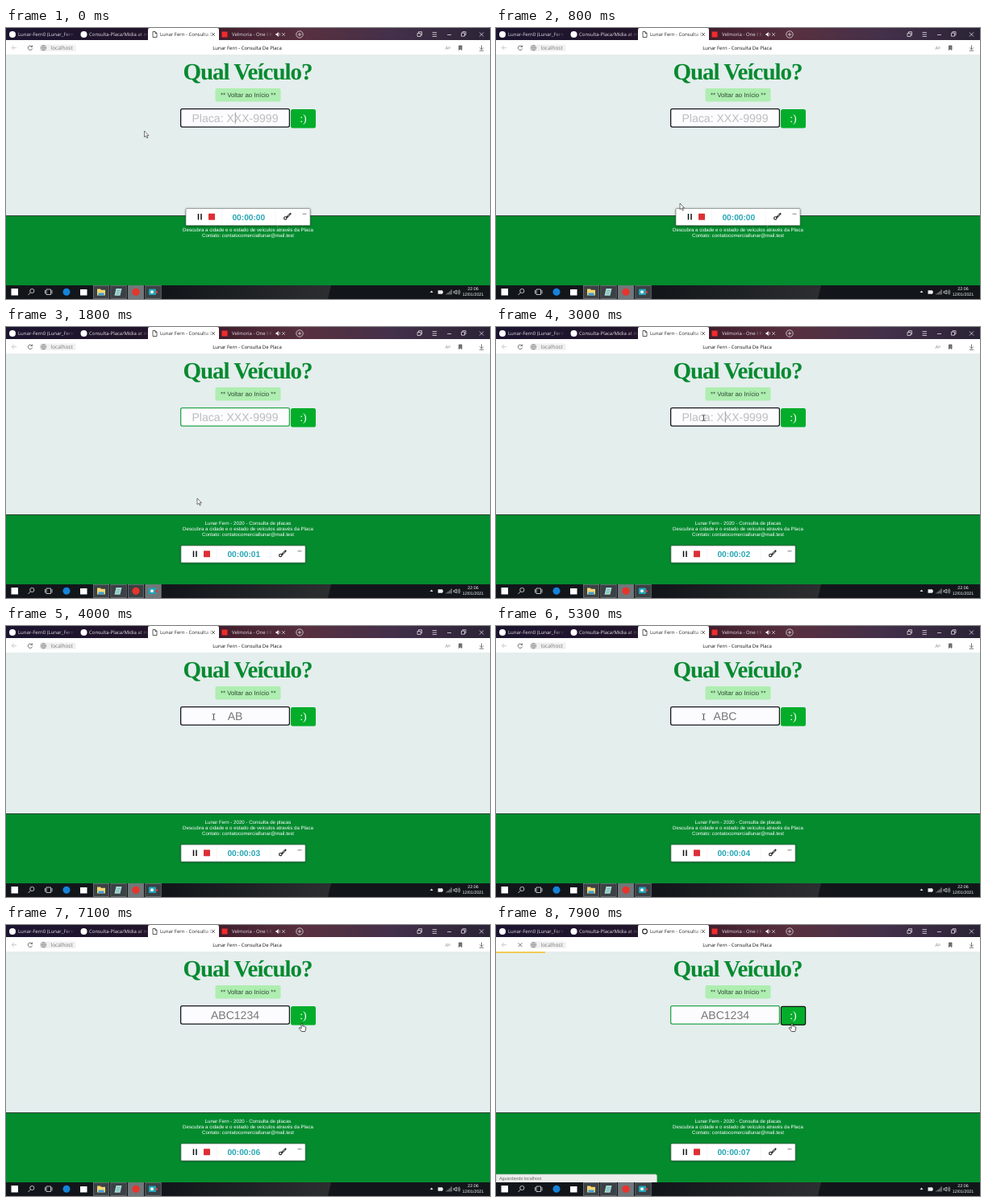
Write an HTML page that moves like this. It is 600 px wide and 337 px high and loops after 8000 ms.

```html
<!DOCTYPE html>
<html lang="pt-BR">
<head>
<meta charset="utf-8">
<title>Consulta De Placa</title>
<style>
  html, body { margin: 0; width: 100%; height: 100%; overflow: hidden; background: #e4eeed; }
  svg { display: block; width: 600px; height: 337px; }
  text { white-space: pre; text-rendering: geometricPrecision; }
  .ui { font: 6px "Open Sans", "Noto Sans", sans-serif; }
  .url { font-size: 6.5px; }
  .page { font-family: "Liberation Sans", Arial, sans-serif; }
  .serif { font-family: "Liberation Serif", "Times New Roman", serif; }
  .mid { text-anchor: middle; }
  .line { fill: none; stroke-width: .8; }
</style>
</head>
<body>
<svg viewBox="0 0 600 337" xmlns="http://www.w3.org/2000/svg">
  <defs>
    <linearGradient id="bar"><stop stop-color="#1c1530"/><stop offset=".28" stop-color="#21142a"/><stop offset=".46" stop-color="#44202f"/><stop offset=".62" stop-color="#58303f"/><stop offset=".8" stop-color="#43304a"/><stop offset="1" stop-color="#2a2336"/></linearGradient>
    <linearGradient id="glow"><stop stop-color="#12161a"/><stop offset="1" stop-color="#2c2e30"/></linearGradient>
    <linearGradient id="light"><stop offset=".8" stop-color="#e6e2e8"/><stop offset="1" stop-color="#e6e2e8" stop-opacity=".1"/></linearGradient>
    <linearGradient id="dark"><stop offset=".8" stop-color="#222"/><stop offset="1" stop-color="#222" stop-opacity=".1"/></linearGradient>
    <filter id="soft" x="-10%" y="-40%" width="120%" height="180%"><feDropShadow dx="0" dy=".5" stdDeviation="1.2" flood-opacity=".55"/></filter>
  </defs>

  <!-- page -->
  <rect width="600" height="337" fill="#e4eeed"/>
  <text class="serif mid" x="299.5" y="63.8" font-size="29" font-weight="700" letter-spacing="-1" fill="#078a30">Qual Veículo?</text>
  <rect x="259.5" y="75" width="81" height="16.5" rx="2" fill="#aeeeb0"/>
  <text class="page mid" x="300.2" y="85.6" font-size="7.86" fill="#2f4a35">** Voltar ao Início **</text>
  <rect id="field" x="216.6" y="100.7" width="134.8" height="22.4" rx="2" fill="#fcfcff" stroke-width="1.3"/>
  <text id="plate" class="page mid" x="284" y="117" font-size="14.05"></text>
  <path id="caret" d="M284.3 105v14" stroke="#777" stroke-width=".7"/>
  <rect x="353" y="101" width="31" height="23.5" rx="2.5" fill="#03ad2a"/>
  <rect id="ring" x="353.4" y="101.4" width="30.2" height="22.7" rx="2" fill="none" stroke="#111" stroke-width="1.2"/>
  <text class="serif mid" x="368.5" y="117" font-size="14" fill="#fff">:)</text>

  <!-- footer -->
  <rect y="234" width="600" height="87" fill="#048b2e"/>
  <rect y="233" width="600" height="1" fill="#26402f"/>
  <g class="page mid" font-size="6.15" fill="#fff">
    <text x="300" y="246">Lunar Fern - 2020 - Consulta de placas</text>
    <text x="300" y="253">Descubra a cidade e o estado de veículos através da Placa</text>
    <text x="300" y="260">Contato: contatocomerciallunar@mail.test</text>
  </g>

  <!-- tabs -->
  <rect width="600" height="16" fill="url(#bar)"/>
  <path d="M176 16V2q0-2 2-2h84q2 0 2 2v14z" fill="#fff"/>
  <circle cx="8" cy="8" r="4" fill="#fff"/>
  <circle cx="96.5" cy="8" r="4" fill="#fff"/>
  <rect x="267.5" y="4.5" width="7" height="7" fill="#f02b2b"/>
  <g class="ui" fill="url(#light)">
    <text x="15" y="10.2">Lunar-Fern0 (Lunar_Fern</text>
    <text x="103" y="10.2">Consulta-Placa/Midia at m</text>
    <text x="280" y="10.2">Velmoria - One I K</text>
  </g>
  <text class="ui" x="191" y="10.2" fill="url(#dark)">Lunar Fern - Consulta D</text>
  <path id="doc" class="line" d="M182 4.5h3l2 2v5h-5zM185 4.5v2h2" stroke="#333"/>
  <circle id="spin" cx="184.5" cy="8" r="2.9" fill="none" stroke="#222" stroke-width="1.1"/>
  <path class="line" d="M255 6l4 4m0-4l-4 4" stroke="#555"/>
  <path d="M334.5 7h1.2l2-2v6l-2-2h-1.2z" fill="#fff"/>
  <path class="line" d="M338.8 6.2q1.5 1.8 0 3.6M342 6l4 4m0-4l-4 4" stroke="#c8c0c8"/>
  <g class="line" stroke="#e2dce4">
    <circle cx="364" cy="8" r="4.2"/>
    <path d="M361.8 8h4.4M364 5.8v4.4"/>
    <path d="M510 6.5h4v4h-4zM511.5 6.5v-1.8h4v4.3h-1.5"/>
    <path d="M528.5 5.5h5.5M528.5 8h5.5M528.5 10.5h5.5M547 8.5h5"/>
    <path d="M564.5 6.2h4v4h-4zM566 6v-1.3h4v4h-1.3M587 5.5l5 5m0-5l-5 5"/>
  </g>

  <!-- toolbar -->
  <rect y="15" width="600" height="18" fill="#fff"/>
  <path class="line" d="M13 24.7H7.5M10 22l-2.7 2.7 2.7 2.7" stroke="#bbb"/>
  <g class="line" stroke="#555">
    <path id="reload" d="M32.2 23.2a2.7 2.7 0 1 0 .4 2.3M32.6 21.5v2h-2"/>
    <path id="stop" d="M27.6 22.3l4.8 4.8m0-4.8l-4.8 4.8"/>
    <path d="M565 22h-3.5v5.5l1.75-1.6 1.75 1.6z" fill="#777"/>
    <path d="M589.5 21.5v5M587.2 24.5l2.3 2.3 2.3-2.3M586.8 28.2h5.4"/>
  </g>
  <rect x="42" y="20.5" width="44.5" height="8.5" rx="1.5" fill="#f1f1f1"/>
  <g class="line" stroke="#888">
    <circle cx="46.5" cy="24.7" r="3.2"/>
    <path d="M43.5 24.7h6M46.5 21.5q-2.6 3.2 0 6.4q2.6-3.2 0-6.4"/>
  </g>
  <text class="ui url" x="55.5" y="27" fill="#777">localhost</text>
  <text class="ui mid" x="299" y="26.8" fill="#111">Lunar Fern - Consulta De Placa</text>
  <text class="ui" x="544.5" y="27" fill="#888">A<tspan dy="-1.5" font-size="4">B</tspan></text>
  <rect id="load" y="33.2" height="1.7" fill="#f3c63b"/>

  <!-- status -->
  <g id="status">
    <path d="M0 310h197.5q2 0 2 2v8.5H0z" fill="#eceeec" stroke="#aab5ac" stroke-width=".6"/>
    <text class="page" x="4" y="317" font-size="5.4" fill="#666">Aguardando localhost</text>
  </g>

  <!-- taskbar -->
  <rect y="320" width="600" height="17" fill="#12161a"/>
  <path d="M200 320h203l-4 17H200z" fill="url(#glow)"/>
  <g fill="#3b4145" stroke="#84898c" stroke-width=".6">
    <rect x="108.3" y="320.3" width="19.4" height="16.4"/>
    <rect x="129.8" y="320.3" width="19.4" height="16.4"/>
    <rect id="appA" x="151.3" y="320.3" width="19.4" height="16.4"/>
    <rect id="appB" x="172.8" y="320.3" width="19.4" height="16.4"/>
  </g>
  <rect x="6.5" y="324" width="8.5" height="8.5" fill="#fff"/>
  <g class="line" stroke="#e4e6e8">
    <circle cx="38" cy="327" r="2.6" transform="translate(-5.7 0)"/>
    <path d="M30.4 329l-2.9 3M50 325h5.5v6.5H50zM48.5 326v4.5M57 326v4.5"/>
  </g>
  <circle cx="75" cy="328.3" r="4.5" fill="#1683d8"/>
  <rect x="92" y="325" width="8.5" height="7.5" fill="#fff"/>
  <path d="M113 324.5h4l1 1.3h5v6.7h-10z" fill="#f5d673"/>
  <path d="M114.5 329.5h7v3h-7z" fill="#3d9ddb"/>
  <path d="M136.5 324h7l-2 8.7h-7z" fill="#a9dbd6"/>
  <path d="M137.5 326.5h4M137 328.5h4M136.5 330.5h4" stroke="#4c8e91" stroke-width=".5"/>
  <circle cx="161" cy="328.3" r="4.6" fill="#e8342c"/>
  <rect x="177" y="324.5" width="9" height="7.5" rx="1" fill="#21a5b6"/>
  <circle cx="181" cy="328.2" r="2" fill="#e9f6f7"/>
  <circle cx="186.5" cy="328.5" r="1.5" fill="#de3c3c"/>
  <path d="M525.5 329l2-2.5 2 2.5z" fill="#ddd"/>
  <path d="M535.5 326.3h5.5v1h.8v2.4h-.8v1h-5.5z" fill="#eee"/>
  <g class="line" stroke="#ddd">
    <path d="M546 331.5v-1M548 331.5v-2.5M550 331.5v-4M552 331.5v-6"/>
    <path d="M555 327.5h1.5l1.7-1.5v5l-1.7-1.5H555zM560 326.5q1.3 2 0 4M561.7 325.5q2 3 0 6"/>
  </g>
  <g class="page mid" font-size="5.3" fill="#f2f2f2">
    <text x="579" y="325.8">22:06</text>
    <text x="579" y="333.3">12/01/2021</text>
  </g>

  <!-- recorder -->
  <g id="panel">
    <rect x="217" y="272" width="154" height="21" rx="1" fill="#fff" stroke="#707874" stroke-width=".6" filter="url(#soft)"/>
    <path d="M232.5 278.5v7.5M236 278.5v7.5" stroke="#111" stroke-width="1.5"/>
    <rect x="245" y="278.2" width="8" height="8" rx=".6" fill="#dc2f36"/>
    <path d="M261.5 274v17M328 274v17" stroke="#eee" stroke-width=".6"/>
    <text id="clock" class="page mid" x="294.8" y="286" font-size="10.2" font-weight="700" fill="#27a7b5"></text>
    <path d="M346.5 278.5l-4.2 4.2" stroke="#222" stroke-width="2.2" stroke-linecap="round"/>
    <path d="M345.8 279.2l-2.5 2.5" stroke="#fff" stroke-width=".8"/>
    <circle cx="340.3" cy="284" r="1.7" fill="none" stroke="#222" stroke-width="1.1"/>
    <path d="M361.5 278.7h5" stroke="#666" stroke-width=".8"/>
  </g>

  <!-- pointers, hot spot at 0,0 -->
  <g id="mouse">
    <path id="arrow" d="M0 0v7.7l1.8-1.6 1.3 2.8 1.3-.5-1.3-2.7h2.4z" fill="#fff" stroke="#222" stroke-width=".6"/>
    <path id="beam" class="line" d="M-1.9-3.8q1.9 0 1.9.8v6q0 .8-1.9.8M1.9-3.8q-1.9 0-1.9.8v6q0 .8 1.9.8" stroke="#444"/>
    <path id="hand" d="M-.9.2q.9-.9 1.7 0v3l3 .6q1.2.4 1 1.7l-.6 3-.6 1.5h-4.2l-3-4q-.1-1.2 1.1-.9l1.6 1z" fill="#fff" stroke="#111" stroke-width=".7"/>
  </g>
</svg>
<script>
const LOOP = 8000, STEP = 100;
const FOCUS_OUT = 1100, FOCUS_IN = 2600, CLICK = 7400;

// [ms, x, y]
const mousePath = [
  [0, 171.5, 128], [800, 228, 218], [1000, 228, 234], [1100, 228, 234],
  [1500, 222, 281], [1600, 222, 281], [1800, 237, 213], [2600, 257.5, 113],
  [6000, 257.5, 113], [6300, 285, 106], [6900, 367, 122.5], [8000, 367, 122.5]
];
const panelPath = [[0, 6, -47.5], [1100, 6, -47.5], [1500, 0, 0], [8000, 0, 0]];
const typed = [3600, 3900, 4200, 5600, 5800, 6500, 6800];
const ticks = [1600, 2600, 3600, 4200, 5600, 6600, 7600];
const caretOn = [[0, 500], [FOCUS_IN, 3200]];

const $ = id => document.getElementById(id);
const show = (id, on) => $(id).setAttribute("visibility", on ? "visible" : "hidden");
const count = (list, t) => list.filter(at => at <= t).length;

function along(path, t) {
  const i = path.findIndex(p => p[0] > t);
  const [t0, x0, y0] = path[i - 1], [t1, x1, y1] = path[i];
  const k = (t - t0) / (t1 - t0);
  return [x0 + (x1 - x0) * k, y0 + (y1 - y0) * k];
}
const place = (id, [x, y]) => $(id).setAttribute("transform", `translate(${x} ${y})`);

function draw(t) {
  const [x, y] = along(mousePath, t);
  const inRow = y > 101 && y < 124;
  const shape = inRow && x > 353 ? "hand" : inRow && x > 216 && x < 352 ? "beam" : "arrow";
  place("mouse", [x, y]);
  for (const id of ["arrow", "beam", "hand"]) show(id, id === shape);

  place("panel", along(panelPath, t));
  $("clock").textContent = "00:00:0" + count(ticks, t);

  const chars = count(typed, t);
  $("plate").textContent = chars ? "ABC1234".slice(0, chars) : "Placa: XXX-9999";
  $("plate").setAttribute("fill", chars ? "#777" : "#bdbdc0");
  show("caret", caretOn.some(([a, b]) => t >= a && t < b));

  const away = t >= FOCUS_OUT && t < FOCUS_IN;
  const sent = t >= CLICK;
  $("field").setAttribute("stroke", away || sent ? "#27a54c" : "#15151c");
  $("appA").setAttribute("fill", away ? "#3b4145" : "#70777b");
  $("appB").setAttribute("fill", away ? "#70777b" : "#3b4145");

  for (const id of ["ring", "spin", "stop", "status"]) show(id, sent);
  for (const id of ["doc", "reload"]) show(id, !sent);
  $("load").setAttribute("width", sent ? (t - 7345) * .11 : 0);
}

let start;
function tick(now) {
  start ??= now;
  const t = (now - start) % LOOP;
  draw(Math.floor(t / STEP) * STEP);
  requestAnimationFrame(tick);
}
draw(0);
requestAnimationFrame(tick);
</script>
</body>
</html>
```
